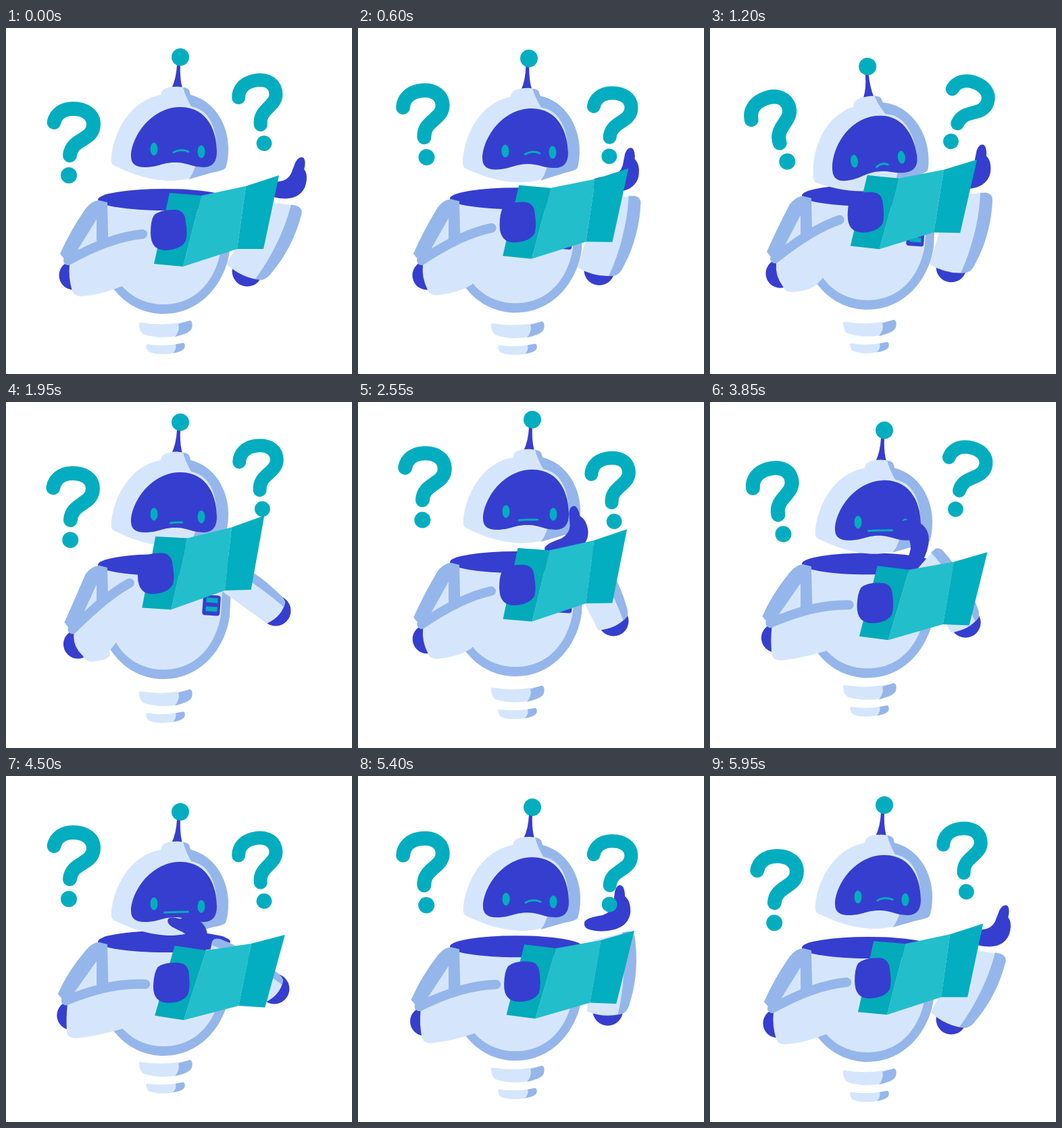
An HTML page for the animation above (6 s loop, 512 px wide and 512 px high).

```html
<!DOCTYPE html>
<html lang="en">
<head>
<meta charset="utf-8">
<title>Puzzled robot</title>
<style>
  html, body { margin: 0; width: 100%; height: 100%; overflow: hidden; background: #fff; }
  svg { display: block; width: 100vw; height: 100vh; }
  .light { fill: #d5e6fc; }
  .shade { fill: #95b6ea; }
  .blue { fill: #363ecf; }
  .teal { fill: #02adbf; }
  .line { fill: none; stroke-linecap: round; stroke-linejoin: round; }
</style>
</head>
<body>
<svg viewBox="0 0 512 512">
  <defs>
    <g id="mark">
      <path class="line" stroke="#02adbf" stroke-width="21" d="M-22-28C-19-41-8-48 6-48C24-48 36.5-39 36.5-25C36.5 0 4-5 1.5 21"/>
      <circle class="teal" cy="50.5" r="12"/>
    </g>
  </defs>

  <g id="springs">
    <path class="light" d="M200 436Q236 442 272 433Q277 434 275 444Q273 451 262 454Q230 462 203 453Q197 448 197 438Q197 435 200 436Z"/>
    <path class="shade" d="M255 438L272 433Q277 434 275 444Q273 451 250 457Q258 447 255 438Z"/>
    <path class="light" d="M209 468Q236 472 262 466Q266 467 264 474Q260 479 248 481Q225 485 211 479Q207 474 207 469Z"/>
    <path class="shade" d="M251 468L262 466Q266 467 264 474Q260 479 247 481Q253 475 251 468Z"/>
  </g>

  <g id="body">
    <path class="shade" d="M138 256L140 340C145 380 180 423 233 423C290 423 325 375 331 330L334 262Z"/>
    <path class="light" d="M150 262L152 340C160 380 190 409 233 409C280 409 310 375 318 328L322 262Z"/>
    <g transform="rotate(4 304 314)">
      <rect class="blue" x="291" y="299" width="26" height="30" rx="4"/>
      <path class="teal" d="M296 303h17v7h-17zM296 316h17v7h-17z"/>
    </g>
    <ellipse class="blue" cx="234" cy="254" rx="98" ry="16"/>
  </g>

  <g id="leftArm">
    <circle id="leftElbow" class="blue" r="21.5"/>
    <path id="upperArm" class="shade"/>
    <path id="armGap" class="light"/>
    <path id="forearm" class="light"/>
    <path id="forearmBand" class="line" stroke="#95b6ea" stroke-width="14"/>
  </g>

  <g id="head">
    <path class="blue" d="M245 89Q252 75 253 54L258 54Q257 75 261 89Z"/>
    <circle class="teal" cx="258" cy="43" r="13"/>
    <path class="light" d="M156 192C158 160 180 108 229 99Q230 90 240 88Q256 85 268 89Q272 91 273 99C310 108 329 145 329 178Q329 195 325 207Q322 211 312 211Q295 216 275 221Q262 226 238 226C205 224 180 213 159 203Q155 201 156 192Z"/>
    <path class="shade" d="M262 88Q267 88 271 92L273 99C310 108 329 145 329 178Q329 195 325 207Q322 211 305 214L270 224Q276 218 280 205L312 183C312 155 305 122 274 116Q266 102 262 88Z"/>
    <path class="blue" d="M185 190C185 163 213 117 259 117C300 118 312 155 312 183Q312 206 292 206C275 206 268 199 250 199C232 199 225 206 205 206Q185 206 185 190Z"/>
    <ellipse class="teal" cx="219" cy="179" rx="5.5" ry="9.5"/>
    <ellipse class="teal" cx="289" cy="183" rx="5.5" ry="9.5"/>
    <path id="mouth" class="line" stroke="#02adbf" stroke-width="3"/>
  </g>

  <g id="rightArm">
    <circle class="blue" r="22.5"/>
    <path id="rightHand" class="blue" d="M-37 8Q-37 1-10-3Q4-8 6-20L8-38Q11-49 18-47Q23-43 23-31Q32-24 31-6Q28 12 8 18Q-14 24-33 17Q-38 14-37 8Z"/>
    <g id="rightForearm">
      <path class="light" d="M-32-4Q-5 12 24 8Q32 4 36-6C52-35 60-70 61-100Q61-108 52-110L-2-106Z"/>
      <path class="shade" d="M14 9L24 8Q32 4 36-6C52-35 60-70 61-100Q61-108 52-110L43-110C42-75 32-30 14 9Z"/>
    </g>
  </g>

  <g id="book">
    <path fill="#02aaba" d="M1-55L48-51L21 54L-22 50Z"/>
    <path fill="#22becb" d="M48-51L114-65L101 28L21 54Z"/>
    <path fill="#02aebf" d="M114-65L163-81L140 28L101 28Z"/>
    <path class="blue" d="M-22-22Q-12-31 10-30Q24-29 25-12Q28 5 25 16Q18 29-5 30Q-27 30-27 4Q-27-14-22-22Z"/>
  </g>

  <use id="leftMark" href="#mark"/>
  <use id="rightMark" href="#mark"/>
</svg>
<script>
const LOOP = 6000;
const $ = id => document.getElementById(id);
const set = (id, name, value) => $(id).setAttribute(name, value);
const move = (id, transform) => set(id, 'transform', transform);
const shape = (id, d) => set(id, 'd', d);

const wave = (t, period) => Math.cos(2 * Math.PI * t / period);
const swing = (t, period) => (1 - wave(t, period)) / 2;
const ease = (t, from, to) => {
  const u = Math.min(1, Math.max(0, (t - from) / (to - from)));
  return u * u * (3 - 2 * u);
};
const pulse = (t, a, b, c, d) => ease(t, a, b) - ease(t, c, d);

// raise and tilt: book; arm: right forearm angle; lift: right elbow height; palm: right hand angle
const POSES = [
  { at: 0, raise: 0, tilt: 0, arm: 12, lift: 0, palm: 15 },
  { at: 650, raise: 10, tilt: .5, arm: 0, lift: 0, palm: 5 },
  { at: 1200, raise: 20, tilt: 1, arm: 0, lift: 0, palm: 5 },
  { at: 1950, raise: 32, tilt: -1.7, arm: -66, lift: 1, palm: 40 },
  { at: 3150, raise: -10, tilt: .4, arm: -14, lift: 0, palm: -60 },
  { at: 4500, raise: -16, tilt: 3.5, arm: -70, lift: .95, palm: -70 },
  { at: 5400, raise: -7, tilt: 1.9, arm: -10, lift: .3, palm: 0 },
  { at: 5850, raise: -1, tilt: .2, arm: 12, lift: 0, palm: 15 },
];

function poseAt(t) {
  const i = POSES.findLastIndex(p => p.at <= t);
  const a = POSES[i], b = POSES[i + 1] || { ...POSES[0], at: LOOP };
  const k = ease(t, a.at, b.at), pose = {};
  for (const key in a) pose[key] = a[key] + (b[key] - a[key]) * k;
  return pose;
}

function drawHead(t, bob) {
  const look = pulse(t, 400, 1100, 1300, 1900);
  const nod = look + pulse(t, 3400, 4100, 4600, 5800);
  move('head', `translate(0 ${bob + 19 * nod}) rotate(${-8 * look} 254 221)`);

  const glum = pulse(t, 500, 1100, 4600, 5300);
  const flat = pulse(t, 1300, 1900, 4600, 5300);
  const half = 11 - 2.5 * glum + 9 * pulse(t, 2000, 3000, 4500, 5300);
  const x = 259 - 7 * flat, y = 183 + 8 * glum;
  shape('mouth', `M${x - half} ${y + 1}Q${x} ${y - 5 + 5 * flat} ${x + half} ${y}`);
}

// Everything is relative to the body; the elbow gives way as the hand rises.
function drawLeftArm(raise, hx, hy) {
  const ex = 80 + .2 * raise, ey = 325 + 9 + .17 * raise;
  const wx = hx - 39, wy = hy + 6 + .25 * raise;
  const endX = ex + 12, endY = ey + 10;
  const band = `M${wx} ${wy}Q${(wx + endX) / 2 + 7} ${(wy + endY) / 2 - 15} ${endX} ${endY}`;
  const lowX = 103 + .5 * raise, lowY = 398;
  set('leftElbow', 'cx', ex + 20);
  set('leftElbow', 'cy', ey + 32);
  shape('upperArm', `M150 258L138 255Q128 255 118 267Q${ex + 15} ${ey - 34} ${ex} ${ey}L${ex + 13} ${ey + 16}L150 320Z`);
  shape('armGap', `M134 283V330L${ex + 20} ${ey + 4}Z`);
  shape('forearm', `${band}L${ex + 14} ${ey + 17}Q${ex + 12} ${ey + 35} ${lowX - 5} ${lowY - 9}Q${lowX - 2} ${lowY} ${lowX + 10} ${lowY - 1}Q${lowX + 40} ${lowY - 4} ${hx - 69} 382L${hx} ${hy + 25}V${hy}Z`);
  shape('forearmBand', band);
}

function drawRightArm({ arm, lift, palm }, bob) {
  const reach = 138, angle = (arm + 11) * Math.PI / 180;
  const width = Math.min(1, 1 + arm / 220);
  move('rightArm', `translate(${357 + 42 * lift} ${360 - 38 * lift + bob})`);
  move('rightForearm', `rotate(${arm}) scale(${width} 1)`);
  move('rightHand', `translate(${reach * Math.sin(angle)} ${-reach * Math.cos(angle)}) rotate(${palm})`);
}

function drawMarks(t, bob) {
  const tilt = swing(t, 500), hop = swing(t, 1000);
  move('leftMark', `translate(93 ${167.5 + bob - 27 * hop}) rotate(${-27.5 * tilt})`);
  move('rightMark', `translate(378 ${122 + bob + 23.5 * hop}) rotate(${34 * tilt}) translate(-7.3 2) rotate(-13.6) scale(.95)`);
}

function draw(t) {
  const bob = 9 * (wave(t, LOOP) - 1);
  const pose = poseAt(t), { raise, tilt } = pose;
  const handX = 241 - .375 * raise - .007 * raise ** 2, handY = 299 - raise;

  move('body', `translate(0 ${bob})`);
  move('springs', `translate(0 ${9.4 * (wave(t - 500, LOOP) - .866)})`);
  move('leftArm', `translate(0 ${bob})`);
  move('book', `translate(${handX} ${handY + bob}) rotate(${tilt})`);
  drawHead(t, bob);
  drawLeftArm(raise, handX, handY);
  drawRightArm(pose, bob);
  drawMarks(t, bob);
}

const start = performance.now();
function tick() {
  draw((performance.now() - start) % LOOP);
  requestAnimationFrame(tick);
}
tick();
</script>
</body>
</html>
```
